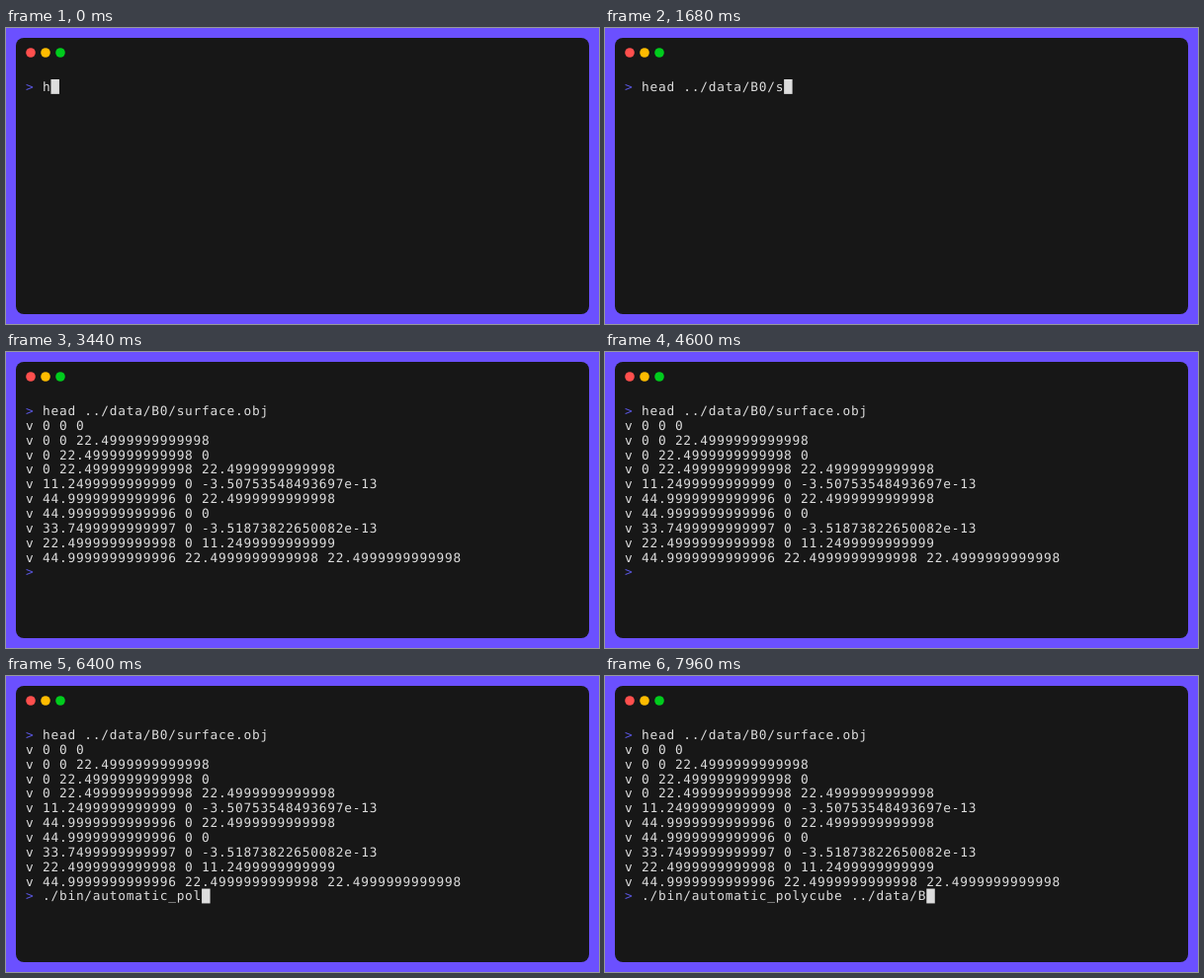
Animation of 600 by 300 pixels, one loop 8000 ms. Source, as an HTML page:

```html
<!DOCTYPE html>
<html lang="en">
<head>
<meta charset="utf-8">
<title>Terminal</title>
<style>
  html, body { margin: 0; width: 100%; height: 100%; overflow: hidden; background: #6b50ff; }
  svg { display: block; width: 600px; height: 300px; }
  text {
    font-family: "DejaVu Sans Mono", monospace;
    font-size: 12.8px;
    fill: #ddd;
    text-rendering: geometricPrecision;
  }
  .prompt { fill: #5a56e0; }
</style>
</head>
<body>
<svg viewBox="0 0 600 300">
  <rect width="600" height="300" fill="#6b50ff"/>
  <rect x="10" y="10" width="580" height="280" rx="8" fill="#171717"/>
  <circle cx="25" cy="25" r="4.8" fill="#ff4f4d"/>
  <circle cx="40" cy="25" r="4.8" fill="#febb00"/>
  <circle cx="55" cy="25" r="4.8" fill="#00cc1d"/>
  <g id="screen"></g>
  <rect id="cursor" fill="#ddd"/>
</svg>
<script>
const LOOP = 8000, TICK = 40;
const LEFT = 20, TOP = 52, CELL_W = 8.48, CELL_H = 14.87, ASCENT = 11.9;
const OUTPUT_AT = 2840, PROMPT_AT = 2880, LAST_ROW = 11;

const output = [
  'v 0 0 0',
  'v 0 0 22.4999999999998',
  'v 0 22.4999999999998 0',
  'v 0 22.4999999999998 22.4999999999998',
  'v 11.2499999999999 0 -3.50753548493697e-13',
  'v 44.9999999999996 0 22.4999999999998',
  'v 44.9999999999996 0 0',
  'v 33.7499999999997 0 -3.51873822650082e-13',
  'v 22.4999999999998 0 11.2499999999999',
  'v 44.9999999999996 22.4999999999998 22.4999999999998'
];

// Each run of key presses: first time, last time, number of keys.
const commands = [
  { text: 'head ../data/B0/surface.obj', row: 0, shown: 1,
    runs: [[120, 840, 8], [960, 1760, 9], [1880, 2680, 9]] },
  { text: './bin/automatic_polycube ../data/B', row: LAST_ROW, shown: 2,
    runs: [[4760, 5480, 8], [5600, 6400, 9], [6480, 7200, 8], [7320, 7960, 7]] }
];

// Cursor visibility changes while waiting at the second prompt.
const blinks = [[3440, false], [4000, true], [4600, false], [4760, true]];

const screen = document.getElementById('screen');
const cursor = document.getElementById('cursor');
cursor.setAttribute('width', CELL_W);
cursor.setAttribute('height', CELL_H);

const colX = col => LEFT + col * CELL_W;
const rowY = row => TOP + row * CELL_H;

function addText(row, col, text, cls) {
  const el = document.createElementNS('http://www.w3.org/2000/svg', 'text');
  el.setAttribute('x', [...text].map((_, i) => colX(col + i).toFixed(2)).join(' '));
  el.setAttribute('y', (rowY(row) + ASCENT).toFixed(2));
  if (cls) el.setAttribute('class', cls);
  el.textContent = text;
  screen.append(el);
  return el;
}

function setVisible(el, on) {
  el.setAttribute('visibility', on ? 'visible' : 'hidden');
}

const lines = output.map((text, i) => addText(i + 1, 0, text));

for (const cmd of commands) {
  cmd.prompt = addText(cmd.row, 0, '>', 'prompt');
  cmd.el = addText(cmd.row, 2, cmd.text);
  cmd.keys = cmd.runs.flatMap(([from, to, n]) =>
    Array.from({ length: n }, (_, i) =>
      Math.round((from + (to - from) * i / (n - 1)) / TICK) * TICK));
}

function typed(cmd, t) {
  const count = cmd.keys.filter(k => k <= t).length;
  return count || cmd.row === 0 ? cmd.shown + count : 0;
}

function cursorCell(t, lengths) {
  if (t < 2800) return [2 + lengths[0], 0];
  if (t < OUTPUT_AT) return [0, 1];
  if (t < PROMPT_AT) return [0, LAST_ROW];
  return [2 + lengths[1], LAST_ROW];
}

function draw(t) {
  const lengths = commands.map(cmd => typed(cmd, t));
  commands.forEach((cmd, i) => {
    const text = cmd.text.slice(0, lengths[i]);
    if (cmd.el.textContent !== text) cmd.el.textContent = text;
  });
  lines.forEach(line => setVisible(line, t >= OUTPUT_AT));
  setVisible(commands[1].prompt, t >= PROMPT_AT);

  const [col, row] = cursorCell(t, lengths);
  cursor.setAttribute('x', colX(col));
  cursor.setAttribute('y', rowY(row));
  setVisible(cursor, blinks.reduce((on, [at, next]) => t >= at ? next : on, true));
}

function frame() {
  draw(performance.now() % LOOP);
  requestAnimationFrame(frame);
}
frame();
</script>
</body>
</html>
```
